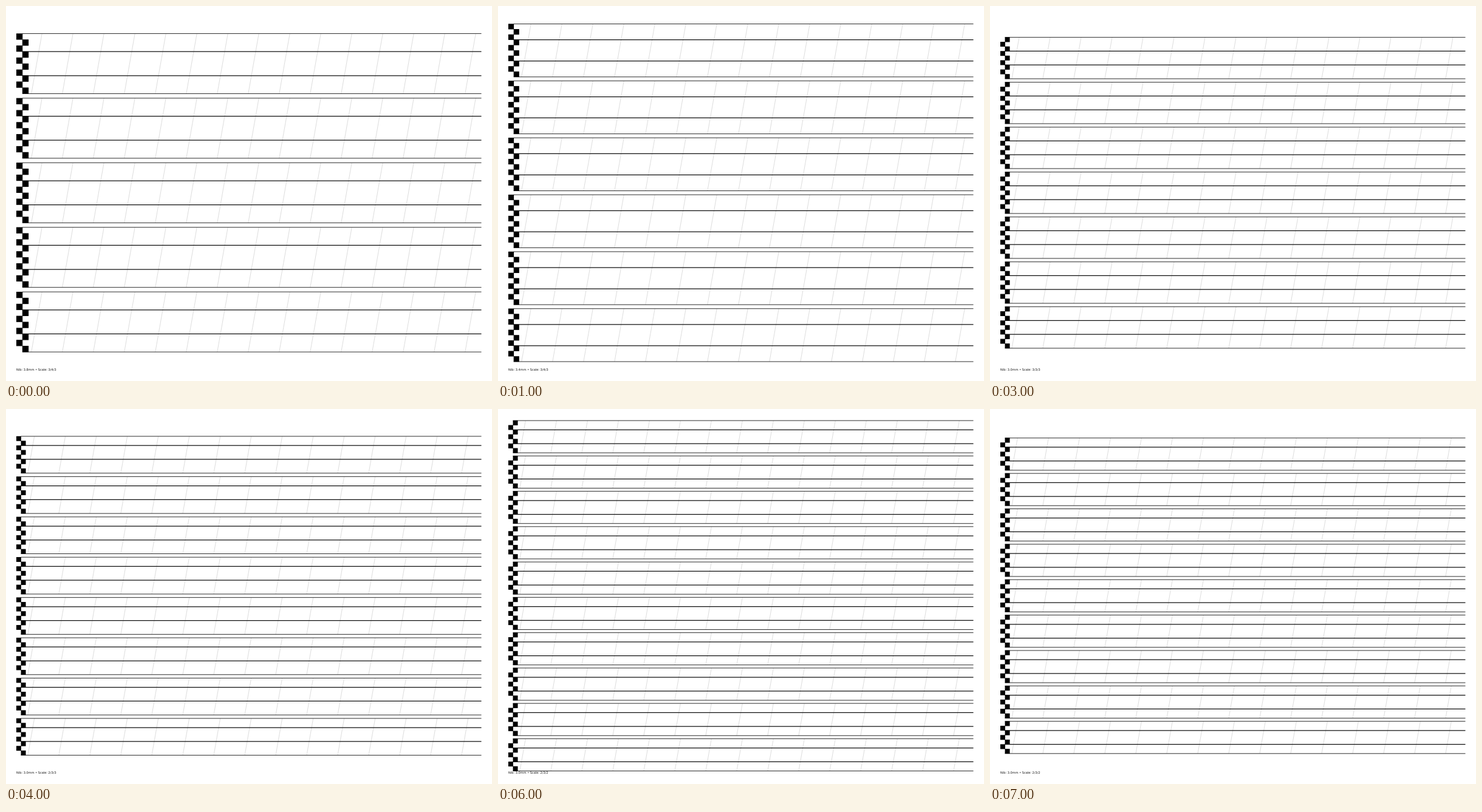
These frames come from a looping animation (800 by 618 pixels, 8 s). An HTML page:

```html
<!DOCTYPE html>
<html lang="en">
<head>
<meta charset="utf-8">
<title>Calligraphy guide sheets</title>
<style>
  html, body { margin: 0; width: 100%; height: 100%; overflow: hidden; background: #fff; }
  svg { display: block; width: 800px; height: 618px; }
  text { font: 5.05px "DejaVu Sans", sans-serif; fill: #111; text-rendering: geometricPrecision; }
  .slant { stroke: #ddd; stroke-width: 1; }
  .outer { stroke: #222; stroke-width: 0.95; }
  .mid { stroke: #111; stroke-width: 1.25; }
</style>
</head>
<body>
<svg id="stage" viewBox="0 0 800 618"></svg>
<script>
const LEFT = 17, RIGHT = 782.5, MIDDLE = 307.8;
const SLANT_STEP = 51, SLANT = Math.tan(10 * Math.PI / 180);
const HOLD = 1000;

// nib label, nib size in px, scale, rows, gap between rows in nibs
const sheets = [
  ["3.8", 9.9, [3, 4, 3], 5, 0.75],
  ["3.4", 8.73, [3, 4, 3], 6, 0.75],
  ["3.0", 7.59, [3, 4, 3], 7, 0.75],
  ["3.0", 7.59, [3, 3, 3], 7, 0.75],
  ["3.0", 7.59, [2, 3, 3], 8, 0.75],
  ["3.0", 7.59, [2, 3, 2], 9, 0.75],
  ["3.0", 7.59, [2, 3, 2], 10, 0.675],
  ["3.0", 7.59, [2, 3, 2], 9, 0.69]
];

const line = (cls, x1, y1, x2, y2) =>
  `<line class="${cls}" x1="${x1}" y1="${y1}" x2="${x2}" y2="${y2}"/>`;

function drawRow(top, nib, scale) {
  const units = scale.reduce((a, b) => a + b);
  const bottom = top + units * nib;
  let out = "";

  const lean = units * nib * SLANT;
  for (let x = LEFT + 2.5 * nib; x + lean < RIGHT; x += SLANT_STEP)
    out += line("slant", x, bottom, x + lean, top);

  let y = top;
  [0, ...scale].forEach((step, i) => {
    y += step * nib;
    out += line(i % 3 ? "mid" : "outer", LEFT + nib, y, RIGHT, y);
  });

  // nib ladder, always ending in the right column
  for (let i = 0; i < units; i++) {
    const col = (units - i) % 2;
    out += `<rect x="${LEFT + col * nib}" y="${top + i * nib - 0.2}" width="${nib + 0.4}" height="${nib + 0.4}"/>`;
  }
  return out;
}

function drawSheet([label, nib, scale, rows, gap]) {
  const units = scale.reduce((a, b) => a + b);
  const pitch = (units + gap) * nib;
  const top = MIDDLE - (rows * pitch - gap * nib) / 2;
  let out = "";
  for (let r = 0; r < rows; r++) out += drawRow(top + r * pitch, nib, scale);
  const base = nib > 9 ? 601.3 : 600.5;
  return out + `<text x="${LEFT}" y="${base}">Nib: ${label}mm • Scale: ${scale.join("/")}</text>`;
}

const stage = document.getElementById("stage");
stage.innerHTML = sheets.map(s => `<g>${drawSheet(s)}</g>`).join("");
const pages = [...stage.children];

function show(ms) {
  const now = Math.floor(ms / HOLD) % pages.length;
  pages.forEach((p, i) => p.setAttribute("display", i === now ? "inline" : "none"));
}

const start = performance.now();
function tick() {
  show(performance.now() - start);
  requestAnimationFrame(tick);
}
tick();
</script>
</body>
</html>
```
